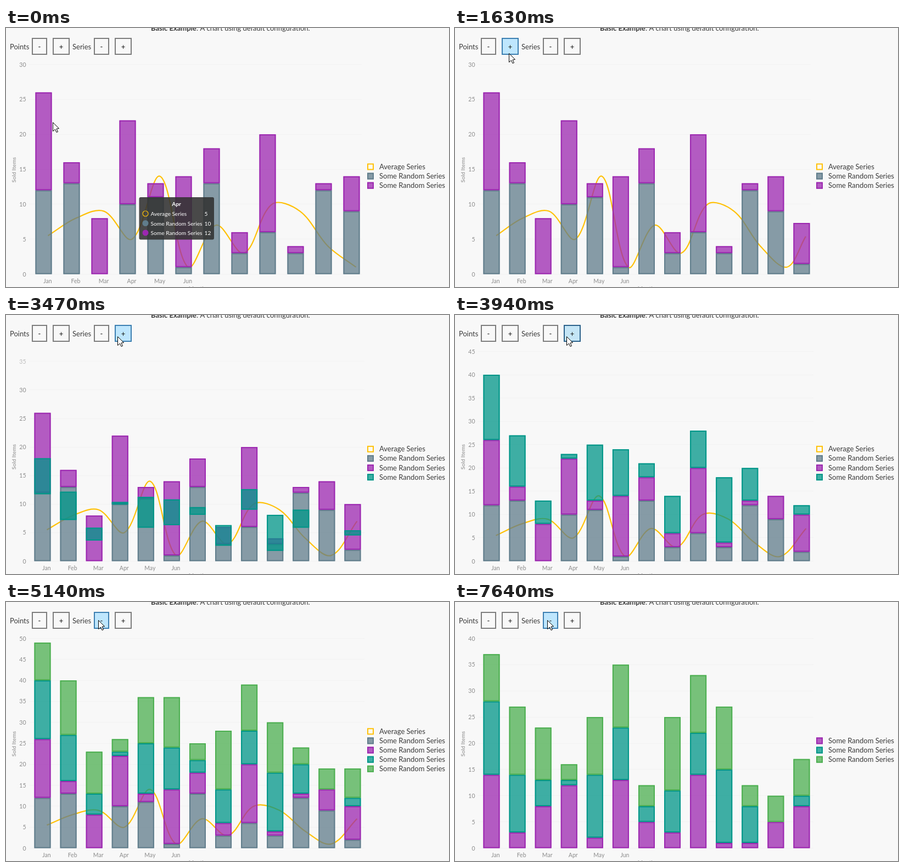
These frames come from a looping animation (807x473 px, 8000 ms). An HTML page with a canvas:

```html
<!DOCTYPE html>
<html lang="en">
<head>
<meta charset="utf-8">
<title>Stacked chart demo</title>
<style>
  html, body { margin: 0; width: 100%; height: 100%; overflow: hidden; background: #f8f8f8; }
  canvas { display: block; }
</style>
</head>
<body>
<canvas id="stage" width="807" height="473"></canvas>
<script>
const ctx = document.getElementById('stage').getContext('2d');
const LOOP = 8000, ANIMATION = 500;
const BASE = 449.5, PLOT_HEIGHT = 383, BAR_WIDTH = 30;
const MONTHS = ['Jan', 'Feb', 'Mar', 'Apr', 'May', 'Jun'];

const SERIES = {
  gray:   { color: '96,125,139', values: [12, 13, 0, 10, 11, 1, 13, 3, 6, 3, 12, 9, 2] },
  purple: { color: '156,39,176', values: [14, 3, 8, 12, 2, 13, 5, 3, 14, 1, 1, 5, 8] },
  teal:   { color: '0,150,136',  values: [14, 11, 5, 1, 12, 10, 3, 8, 8, 14, 7, 0, 2] },
  green:  { color: '76,175,80',  values: [9, 13, 10, 3, 11, 12, 4, 14, 11, 12, 4, 5, 7] }
};
const AVERAGE = [5.5, 8, 9, 5, 14, 1, 7, 3, 10, 9, 4, 1, 7];
const YELLOW = '#ffc107';

const STATES = [
  { at: -ANIMATION, max: 30, count: 12, line: true, names: ['gray', 'purple'] },
  { at: 1265, max: 30, count: 13, line: true, names: ['gray', 'purple'] },
  { at: 3195, max: 45, count: 13, line: true, names: ['gray', 'purple', 'teal'] },
  { at: 4150, max: 50, count: 13, line: true, names: ['gray', 'purple', 'teal', 'green'] },
  { at: 6030, max: 50, count: 13, line: false, names: ['gray', 'purple', 'teal', 'green'] },
  { at: 7130, max: 40, count: 13, line: false, names: ['purple', 'teal', 'green'] }
];

const BUTTONS = [[47, 28, '-'], [85, 31, '+'], [160, 28, '-'], [198, 31, '+']];
const PRESSES = [[1040, 1200], [2850, 3130], [3940, 4080], [5710, 5920], [6840, 7090]];
// start, end, x, y of each pointer move
const MOVES = [
  [190, 740, 97, 45], [950, 1040, 98, 46], [2170, 2290, 194, 42],
  [2470, 2690, 203, 39], [4790, 5140, 168, 33]
];

const mix = (a, b, p) => a + (b - a) * p;
const clamp = v => Math.max(0, Math.min(1, v));
const smooth = p => p * p * (3 - 2 * p);
const unit = state => PLOT_HEIGHT / state.max;
const barX = (state, i) => state.count === 12 ? 53.5 + 51 * i : 51.5 + 47.08 * i;

function text(str, x, y, { size = 13, color = '#3a3a3a', align = 'left', weight = 400 } = {}) {
  ctx.font = `${weight} ${size}px Lato, sans-serif`;
  ctx.textAlign = align;
  ctx.fillStyle = color;
  ctx.fillText(str, x, y);
}

function box(x, y, w, h, fill, stroke) {
  ctx.fillStyle = fill;
  ctx.fillRect(x, y, w, h);
  const line = Math.min(2, h / 2, w / 2);
  ctx.lineWidth = line;
  ctx.strokeStyle = stroke;
  ctx.strokeRect(x + line / 2, y + line / 2, w - line, h - line);
}

const seriesBox = (x, y, w, h, color) => box(x, y, w, h, `rgba(${color},.75)`, `rgb(${color})`);

function pointerAt(t) {
  let x = 85, y = 172;
  for (const [start, end, toX, toY] of MOVES) {
    const p = smooth(clamp((t - start) / (end - start)));
    x = mix(x, toX, p);
    y = mix(y, toY, p);
  }
  return { x, y };
}

function drawControls(t, pointer) {
  text('Basic Example', 264, 4.5, { weight: 700 });
  text('. A chart using default configuration.', 347, 4.5);
  text('Points', 7, 39);
  text('Series', 121, 39);
  const pressed = PRESSES.some(([down, up]) => t >= down && t < up);
  for (const [x, w, label] of BUTTONS) {
    const hover = pointer.x >= x && pointer.x < x + w && pointer.y >= 18 && pointer.y < 49;
    const [fill, stroke] = !hover ? ['#f8f8f8', '#7d7d7d']
      : pressed ? ['#c4e5f6', '#2c628b'] : ['#bee6fd', '#3c7fb1'];
    box(x, 18, w, 31, fill, stroke);
    text(label, x + w / 2, 39, { align: 'center', color: '#111' });
  }
}

function drawAxes(from, to, p) {
  const scale = mix(unit(from), unit(to), p);
  ctx.save();
  ctx.beginPath();
  ctx.rect(0, 56, 807, 417);
  ctx.clip();
  for (let v = 0; v <= Math.max(from.max, to.max); v += 5) {
    const y = BASE - v * scale;
    ctx.globalAlpha = v > to.max ? 1 - p : v > from.max ? p : 1;
    ctx.fillStyle = '#f2f2f2';
    ctx.fillRect(42, Math.round(y - .5), to.max > 30 ? 611 : 606, 1);
    text(v, 36.5, y + 4, { size: 10.5, color: '#8c8c8c', align: 'right' });
  }
  ctx.restore();
  MONTHS.forEach((name, i) =>
    text(name, barX(to, i) + 22.5, 465.5, { size: 10.5, color: '#8c8c8c', align: 'center' }));
  const title = { size: 10, color: '#a4a4a4', align: 'center', weight: 700 };
  text('Months', 350, 478.5, title);
  ctx.save();
  ctx.translate(18, 259);
  ctx.rotate(-Math.PI / 2);
  text('Sold Items', 0, 0, title);
  ctx.restore();
}

function linePoints(state) {
  const points = [];
  for (let i = 0; i < 13; i++) {
    const k = Math.min(i, state.count - 1);
    points.push([barX(state, k) + 23, BASE - AVERAGE[k] * unit(state)]);
  }
  return points;
}

function drawLine(from, to, p) {
  const start = linePoints(from);
  const points = linePoints(to).slice(0, to.count)
    .map((pt, i) => pt.map((v, axis) => mix(start[i][axis], v, p)));
  const at = i => points[Math.max(0, Math.min(points.length - 1, i))];
  const length = (a, b) => Math.hypot(b[0] - a[0], b[1] - a[1]);
  const ratio = (a, b) => a + b ? a / (a + b) : 0;
  ctx.beginPath();
  ctx.moveTo(...points[0]);
  for (let i = 0; i < points.length - 1; i++) {
    const [a, b, c, d] = [at(i - 1), at(i), at(i + 1), at(i + 2)];
    const k1 = ratio(length(a, b), length(b, c)), k2 = ratio(length(b, c), length(c, d));
    const handle = (anchor, side) => [0, 1].map(n => {
      const mid = (b[n] + c[n]) / 2;
      const joint = side === 1
        ? mix((a[n] + b[n]) / 2, mid, k1)
        : mix(mid, (c[n] + d[n]) / 2, k2);
      return anchor[n] + (mid - joint) * .7;
    });
    ctx.bezierCurveTo(...handle(b, 1), ...handle(c, 2), ...c);
  }
  ctx.strokeStyle = YELLOW;
  ctx.lineWidth = 2.2;
  ctx.stroke();
}

// Top and height of one stacked bar; bars not yet present lie flat on the axis.
function barShape(state, name, i) {
  const index = state.names.indexOf(name);
  if (index < 0 || i >= state.count) return [BASE, 0];
  const total = state.names.slice(0, index + 1).reduce((sum, n) => sum + SERIES[n].values[i], 0);
  return [BASE - total * unit(state), SERIES[name].values[i] * unit(state)];
}

function drawBars(from, to, p) {
  for (const name of to.names) {
    for (let i = 0; i < to.count; i++) {
      const [top0, height0] = barShape(from, name, i);
      const [top1, height1] = barShape(to, name, i);
      const height = mix(height0, height1, p);
      if (height > .3) seriesBox(barX(to, i), mix(top0, top1, p), BAR_WIDTH, height, SERIES[name].color);
    }
  }
}

function drawLegend(state) {
  const items = state.line ? ['average', ...state.names] : state.names;
  items.forEach((name, i) => {
    const y = 270.5 + (i - (items.length - 1) / 2) * 17.1;
    if (name === 'average') box(658, y - 6, 12, 12, '#fbfaf6', YELLOW);
    else seriesBox(658, y - 6, 12, 12, SERIES[name].color);
    text(name === 'average' ? 'Average Series' : 'Some Random Series', 680, y + 4.5);
  });
}

function drawTooltip() {
  const white = { size: 10.2, color: '#fff' };
  ctx.fillStyle = 'rgba(50,50,50,.88)';
  ctx.beginPath();
  ctx.roundRect(242.5, 309, 136.5, 77.5, 3);
  ctx.fill();
  text('Apr', 310.5, 325, { ...white, align: 'center', weight: 700 });
  const rows = [
    ['Average Series', 5, YELLOW],
    ['Some Random Series', 10, `rgb(${SERIES.gray.color})`],
    ['Some Random Series', 12, `rgb(${SERIES.purple.color})`]
  ];
  rows.forEach(([label, value, color], i) => {
    const y = 339 + i * 17.5;
    ctx.beginPath();
    ctx.arc(254, y, i ? 5.5 : 5, 0, Math.PI * 2);
    ctx.fillStyle = ctx.strokeStyle = color;
    ctx.lineWidth = 1.2;
    if (i) ctx.fill(); else ctx.stroke();
    text(label, 263.5, y + 4, white);
    text(value, 361.5, y + 4, white);
  });
}

function drawPointer({ x, y }) {
  ctx.save();
  ctx.translate(Math.round(x) + .5, Math.round(y) + .5);
  ctx.beginPath();
  ctx.moveTo(0, 0);
  for (const pt of [[0, 16], [4, 12.5], [6.5, 18], [9, 17], [6.5, 11.5], [11, 11]]) ctx.lineTo(...pt);
  ctx.closePath();
  ctx.fillStyle = '#fff';
  ctx.fill();
  ctx.strokeStyle = '#000';
  ctx.lineWidth = 1;
  ctx.stroke();
  ctx.restore();
}

function draw(t) {
  const current = STATES.findLastIndex(state => t >= state.at);
  const to = STATES[current], from = STATES[Math.max(0, current - 1)];
  const p = clamp((t - to.at) / ANIMATION);
  const pointer = pointerAt(t);
  ctx.fillStyle = '#f8f8f8';
  ctx.fillRect(0, 0, 807, 473);
  drawAxes(from, to, p);
  drawControls(t, pointer);
  if (to.line) drawLine(from, to, p);
  drawBars(from, to, p);
  drawLegend(to);
  if (t < 400) drawTooltip();
  drawPointer(pointer);
}

const began = performance.now();
function tick() {
  draw((performance.now() - began) % LOOP);
  requestAnimationFrame(tick);
}
tick();
</script>
</body>
</html>
```
